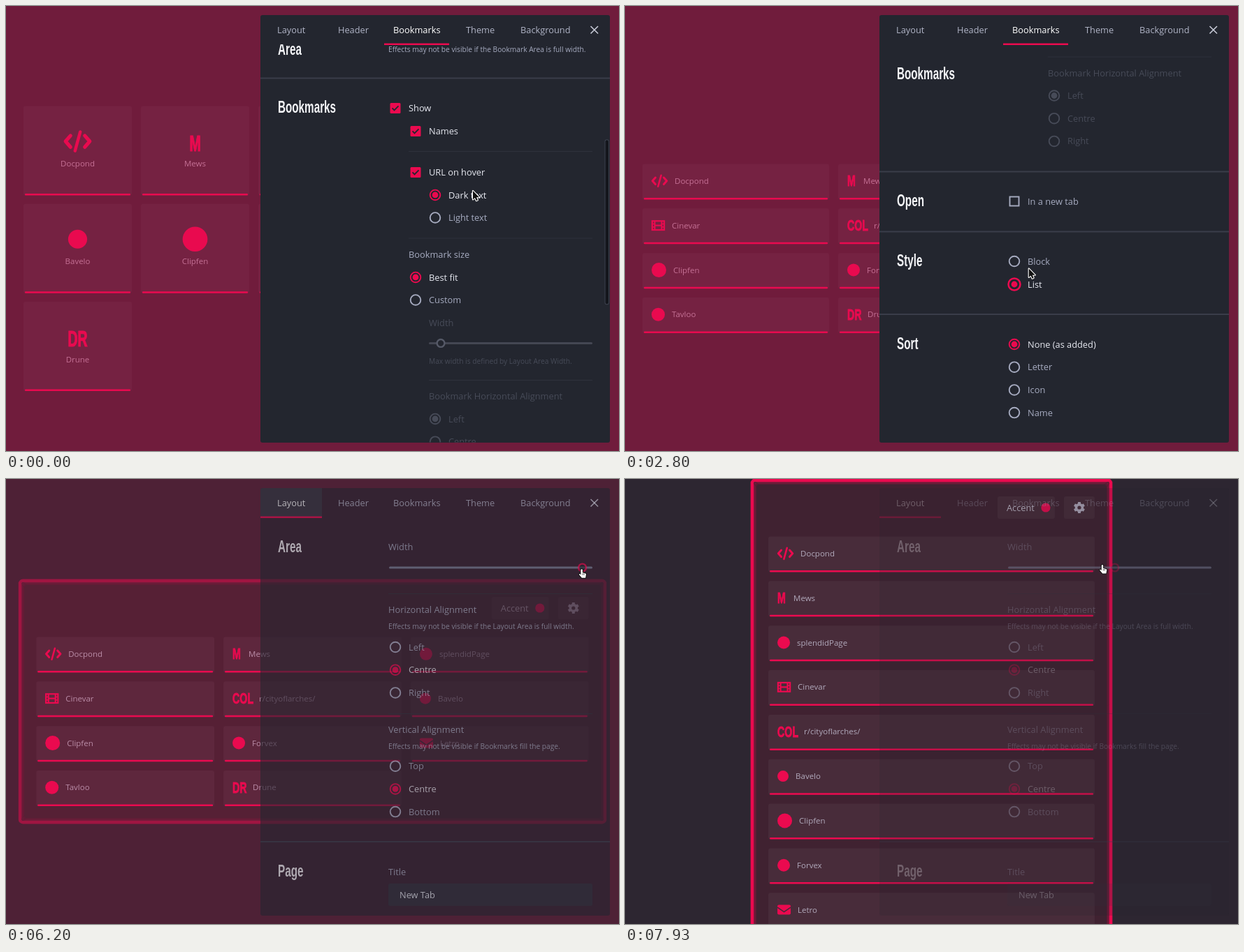
Write an HTML page with a canvas that moves like this. It is 877 by 638 pixels and loops after 8 s.

```html
<!DOCTYPE html>
<html lang="en">
<head>
<meta charset="utf-8">
<title>Bookmark page settings</title>
<style>
html, body { margin: 0; width: 100%; height: 100%; overflow: hidden; background: #2d2631; }
canvas { display: block; }
</style>
</head>
<body>
<canvas id="stage" width="877" height="638"></canvas>
<script>
const ctx = document.getElementById('stage').getContext('2d');
const W = 877, H = 638, LOOP = 8000;
const RED = '#eb0a4f', PANEL = '#23262f', LABEL = '#a6abc0', BRIGHT = '#e6e8f0', DIM = '#474b58';
const LIST_CLICK = 2350, TAB_CLICK = 3650;
const CONDENSE = 0.635;

// Time tracks: [time, value, ...]
const AREA_INSET = [[5940, 0], [6000, 5], [6730, 53], [7000, 64], [7800, 171], [7930, 180], [8000, 184]];
const POINTER = [
  [1780, 668, 265], [2250, 579, 394], [2650, 579, 394], [2800, 578, 377], [3450, 420, 60],
  [3580, 410, 36], [4250, 410, 36], [4730, 573, 190], [5300, 836, 128], [6000, 836, 129],
  [6730, 791, 130], [7000, 781, 130], [7800, 690, 125], [7930, 683, 123], [8000, 680, 123]
];

const TABS = [['Layout', 388], ['Header', 475], ['Bookmarks', 554], ['Theme', 658], ['Background', 736]];

// name, icon (a word in capitals is drawn as letters), icon width in list style
const BOOKMARKS = [
  ['Docpond', 'code', 23], ['Mews', 'M', 13], ['splendidPage', 'disc', 18],
  ['Cinevar', 'film', 19], ['r/cityoflarches/', 'COL', 28], ['Bavelo', 'disc', 16],
  ['Clipfen', 'disc', 21], ['Forvex', 'disc', 18], ['Letro', 'mail', 19],
  ['Tavloo', 'disc', 19], ['Drune', 'DR', 19]
];

const clamp = (v, lo = 0, hi = 1) => Math.min(hi, Math.max(lo, v));

function track(keys, t) {
  const next = keys.findIndex(k => k[0] > t);
  if (next === 0) return keys[0].slice(1);
  if (next < 0) return keys[keys.length - 1].slice(1);
  const a = keys[next - 1], b = keys[next], u = (t - a[0]) / (b[0] - a[0]);
  return a.slice(1).map((v, i) => v + (b[i + 1] - v) * u);
}

// ---------- drawing helpers ----------
function rect(x, y, w, h, color, r = 0) {
  ctx.fillStyle = color;
  ctx.beginPath();
  ctx.roundRect(x, y, w, h, r);
  ctx.fill();
}

function circle(x, y, r, fill, stroke, width = 2) {
  ctx.beginPath();
  ctx.arc(x, y, r, 0, 7);
  if (fill) { ctx.fillStyle = fill; ctx.fill(); }
  if (stroke) { ctx.strokeStyle = stroke; ctx.lineWidth = width; ctx.stroke(); }
}

function line(points, color, width) {
  ctx.strokeStyle = color;
  ctx.lineWidth = width;
  ctx.beginPath();
  points.forEach(([x, y]) => ctx.lineTo(x, y));
  ctx.stroke();
}

// y is the middle of the capital letters
function text(str, x, y, color, size = 12.8, align = 'left') {
  ctx.font = `${size}px "Open Sans", sans-serif`;
  ctx.textAlign = align;
  ctx.fillStyle = color;
  ctx.fillText(str, x, y + size * 0.357);
}

function display(str, x, y, color, size, align = 'left', weight = 0) {
  ctx.save();
  ctx.translate(x, y + size * 0.358);
  ctx.scale(CONDENSE, 1);
  ctx.font = `bold ${size}px "Liberation Sans", sans-serif`;
  ctx.textAlign = align;
  ctx.fillStyle = ctx.strokeStyle = color;
  ctx.fillText(str, 0, 0);
  if (weight) {
    ctx.lineWidth = weight;
    ctx.strokeText(str, 0, 0);
  }
  ctx.restore();
}

// ---------- page ----------
const ICONS = {
  code() {
    ctx.lineCap = ctx.lineJoin = 'round';
    line([[-6, -4.8], [-10.2, 0], [-6, 4.8]], RED, 3);
    line([[6, -4.8], [10.2, 0], [6, 4.8]], RED, 3);
    line([[2.2, -8], [-2.2, 8]], RED, 2.6);
  },
  disc(w) { circle(0, 0, w / 2, RED); },
  film() {
    ctx.strokeStyle = RED;
    ctx.lineWidth = 2.2;
    ctx.strokeRect(-8.6, -6.4, 17.2, 12.8);
    line([[-5, -6], [-5, 6]], RED, 2.2);
    line([[5, -6], [5, 6]], RED, 2.2);
    line([[-5, 0], [5, 0]], RED, 2.2);
    for (const y of [-2.2, 2.2]) {
      line([[-8, y], [-5, y]], RED, 1.6);
      line([[5, y], [8, y]], RED, 1.6);
    }
  },
  mail() {
    rect(-9.5, -7, 19, 14, RED, 2);
    line([[-9.5, -3.5], [0, 3], [9.5, -3.5]], '#46293a', 1.6);
  }
};

function icon(kind, cx, cy, width, scale) {
  ctx.save();
  ctx.translate(cx, cy);
  ctx.scale(scale, scale);
  ICONS[kind](width);
  ctx.restore();
}

function tile(x, y, w, h, [name, kind, iconWidth], list) {
  rect(x, y, w, h, 'rgba(255,255,255,.045)', 3);
  rect(x + 2, y + h - 2.5, w - 4, 2.5, RED, 1);
  const letters = !ICONS[kind], ink = '#b1a9bb';
  if (list) {
    const cy = y + 24.3;
    if (letters) display(kind, x + 13, cy - 0.5, RED, 22.4, 'left', 0.9);
    else icon(kind, x + 13 + iconWidth / 2, cy, iconWidth, 1);
    text(name, x + 23 + iconWidth, cy, ink, 11.5);
  } else {
    const cx = x + w / 2;
    if (letters) display(kind, cx, y + 53, RED, 30.7, 'center', 1.2);
    else icon(kind, cx, y + 50.5, iconWidth, 1.7);
    text(name, cx, y + 82.5, ink, 11.5, 'center');
  }
}

function gear(x, y) {
  circle(x, y, 4.4, null, '#b1a9bb', 3.6);
  for (let i = 0; i < 6; i++) {
    const a = i * Math.PI / 3 + Math.PI / 6, c = Math.cos(a), s = Math.sin(a);
    line([[x + c * 5, y + s * 5], [x + c * 8, y + s * 8]], '#b1a9bb', 4);
  }
}

function frame(x, y, w, h, fade) {
  ctx.globalAlpha = fade;
  rect(x, y, w, h, 'rgba(215,5,50,.11)', 5);
  ctx.strokeStyle = RED;
  const stroke = (inset, width, alpha) => {
    ctx.globalAlpha = fade * alpha;
    ctx.lineWidth = width;
    ctx.beginPath();
    ctx.roundRect(x + inset, y + inset, w - 2 * inset, h - 2 * inset, 4);
    ctx.stroke();
  };
  for (let i = 0; i < 4; i++) stroke(4.5 + i, 1, 0.4 - i * 0.09);
  stroke(1.8, 4.4, 1);
  ctx.globalAlpha = 1;
}

function page(inset, list, fade) {
  const left = inset + 25, inner = W - 2 * left, gap = 13;
  const columns = list ? clamp(Math.floor((inner + gap) / (230 + gap)), 1, 3) : 5;
  const tileW = (inner - gap * (columns - 1)) / columns;
  const tileH = list ? 51 : 128, pitch = list ? 63.85 : 140.2;
  const rows = Math.ceil(BOOKMARKS.length / columns);
  const height = 107.5 + (rows - 1) * pitch + tileH;
  const top = Math.max(0, (H - height) / 2);

  rect(0, 0, W, H, '#2d2631');
  if (fade) frame(inset, top, W - 2 * inset, height, fade);

  const right = left + inner, mid = top + 41;
  rect(right - 139, mid - 16, 82, 32, 'rgba(255,255,255,.045)', 3);
  text('Accent', right - 126, mid, '#c3bccb');
  circle(right - 70, mid, 6.6, RED);
  rect(right - 44, mid - 16, 44, 32, 'rgba(255,255,255,.045)', 3);
  gear(right - 22, mid);

  BOOKMARKS.forEach((b, i) => tile(
    left + (i % columns) * (tileW + gap),
    top + 82.5 + Math.floor(i / columns) * pitch,
    tileW, tileH, b, list));

  ctx.globalAlpha = 0.366 * (1 - fade);
  rect(0, 0, W, H, '#e40c50');
  ctx.globalAlpha = 1;
}

// ---------- settings panel ----------
function panel(t, inset, list, fade) {
  const onLayout = t >= TAB_CLICK;
  const opacity = rest => { ctx.globalAlpha = 1 - fade * (1 - rest); };
  const soft = () => opacity(0.27);

  const label = (str, x, y, color = LABEL) => { soft(); text(str, x, y, color); };
  const note = (str, x, y, color = LABEL) => { soft(); text(str, x, y, color, 10.2); };
  const rule = (x, y) => { soft(); rect(x, y - 0.5, 839 - x, 1, '#2e313c'); };

  function radio(str, x, y, on, { dim = false, halo = 0 } = {}) {
    const color = dim ? DIM : on ? RED : LABEL;
    opacity(on ? 0.27 : 0.34);
    circle(x, y, 7.3 + halo, null, color, 1.9 + halo * 0.5);
    if (on) circle(x, y, 4.4, color);
    label(str, x + 19, y, dim ? DIM : on ? BRIGHT : LABEL);
  }

  function checkbox(str, x, y, on) {
    if (on) {
      rect(x - 7.5, y - 7.5, 15, 15, RED, 1.5);
      line([[x - 4.5, y], [x - 1.5, y + 3], [x + 4.5, y - 3]], PANEL, 1.8);
    } else {
      ctx.strokeStyle = LABEL;
      ctx.lineWidth = 1.9;
      ctx.strokeRect(x - 6.5, y - 6.5, 13, 13);
    }
    label(str, x + 19, y, on ? BRIGHT : LABEL);
  }

  function slider(x, y, thumb, dim) {
    opacity(0.6);
    rect(x, y - 1.5, 839 - x, 3, dim ? '#444753' : '#6b6d82', 1.5);
    soft();
    circle(thumb, y, 5.4, PANEL, dim ? '#555967' : RED, 2.4);
  }

  // Sections: [start, title]; titles stick below the tabs until their section ends.
  function sections(list, end) {
    soft();
    list.forEach(([start, title], i) => {
      const stop = i + 1 < list.length ? list[i + 1][0] : end;
      if (start > 56) rect(364, start - 1, 500, 2, '#3a3d4a');
      display(title, 389, Math.min(Math.max(start + 41, 96), stop - 42), '#f4f5f8', 24);
    });
  }

  function bookmarksTab() {
    const scroll = 464 * (1 - (1 - clamp(t / 1729)) ** 2);
    const at = y => y - scroll;
    sections([[-300, 'Area'], [104, 'Bookmarks'], [701.5, 'Open'], [787.5, 'Style'], [906, 'Sort']]
      .map(([y, title]) => [at(y), title]), at(1090));

    note('Effects may not be visible if the Bookmark Area is full width.', 547, at(62.5));
    checkbox('Show', 557, at(147), true);
    checkbox('Names', 586, at(180), true);
    rule(576, at(209));
    checkbox('URL on hover', 586, at(239), true);
    radio('Dark text', 614, at(271.5), true);
    radio('Light text', 614, at(304), false);
    rule(576, at(333.5));
    label('Bookmark size', 576, at(356.5));
    radio('Best fit', 586, at(389.5), true);
    radio('Custom', 586, at(422), false);
    label('Width', 605, at(455), DIM);
    slider(605, at(484), 622, true);
    note('Max width is defined by Layout Area Width.', 605, at(510), DIM);
    rule(605, at(537));
    label('Bookmark Horizontal Alignment', 605, at(560), DIM);
    ['Left', 'Centre', 'Right'].forEach((s, i) => radio(s, 614, at(592.5 + i * 32.7), i === 0, { dim: true }));
    checkbox('In a new tab', 557, at(744), false);
    radio('Block', 557, at(830), !list);
    radio('List', 557, at(863), list, { halo: list ? 1.2 : 0 });
    ['None (as added)', 'Letter', 'Icon', 'Name'].forEach((s, i) => radio(s, 557, at(949 + i * 32.7), i === 0));

    ctx.globalAlpha = clamp((1800 - t) / 150);
    rect(856.5, 191 + scroll * 0.4207, 6.5, 237, '#3d414e', 3.2);
    rect(857.5, 192 + scroll * 0.4207, 4.5, 235, '#14161c', 2.2);
  }

  function layoutTab() {
    sections([[55, 'Area'], [520, 'Page']], 900);
    label('Width', 547, 97.5);
    slider(548, 127, 838.5 - inset * 0.765, false);
    rule(547, 164.5);
    label('Horizontal Alignment', 547, 187.5);
    note('Effects may not be visible if the Layout Area is full width.', 547, 211.5);
    ['Left', 'Centre', 'Right'].forEach((s, i) => radio(s, 557, 241 + i * 32.7, i === 1));
    rule(547, 336.5);
    label('Vertical Alignment', 547, 359);
    note('Effects may not be visible if Bookmarks fill the page.', 547, 383);
    ['Top', 'Centre', 'Bottom'].forEach((s, i) => radio(s, 557, 411.7 + i * 32.7, i === 1));
    label('Title', 547, 563);
    opacity(0.15);
    rect(547, 580, 292, 32, '#2f313d', 2);
    label('New Tab', 563, 596, BRIGHT);
  }

  opacity(0.2);
  rect(364, 13, 500, 613, PANEL, 3);

  ctx.save();
  ctx.beginPath();
  ctx.rect(364, 55, 500, 570.5);
  ctx.clip();
  onLayout ? layoutTab() : bookmarksTab();
  ctx.restore();

  const active = onLayout ? 'Layout' : 'Bookmarks';
  if (onLayout) {
    ctx.globalAlpha = 1 - fade;
    rect(364, 13, 88, 41, '#363a46', [3, 0, 0, 0]);
  }
  soft();
  if (onLayout) rect(364, 53.5, 88, 2.4, RED);
  else rect(541, 53.5, 93, 2.4, RED);
  TABS.forEach(([name, x]) => label(name, x, 34.5, name === active ? '#fff' : '#b0b4c6'));
  line([[836.5, 29], [847, 39.5]], '#c8cbd8', 1.6);
  line([[847, 29], [836.5, 39.5]], '#c8cbd8', 1.6);
  ctx.globalAlpha = 1;
}

// ---------- pointer ----------
const ARROW = new Path2D('M0 0V12.5L2.9 9.9 4.9 14.2 6.9 13.3 5 9.2H9Z');
const HAND = new Path2D('M-1.2 1.2a1.2 1.2 0 0 1 2.4 0V5l4 .9q1.3.4 1.1 1.8L5.5 12.4H.2L-3.6 8q-.5-1.5.9-1.2l1.5 1.1Z');

function pointer(t) {
  const [x, y] = track(POINTER, t);
  const hand = (t > 2200 && t < 2720) || (t > 3530 && t < 4300) || t > 5250;
  const shape = hand ? HAND : ARROW;
  ctx.save();
  ctx.translate(x, y);
  ctx.lineJoin = 'round';
  ctx.lineWidth = hand ? 2 : 2.2;
  ctx.strokeStyle = hand ? '#111' : '#fff';
  ctx.fillStyle = hand ? '#fff' : '#111';
  ctx.stroke(shape);
  ctx.fill(shape);
  if (hand) for (const fx of [1.4, 3.4]) line([[fx, 6], [fx, 8.5]], '#111', 0.7);
  ctx.restore();
}

function render(now) {
  const t = now % LOOP;
  const [inset] = track(AREA_INSET, t);
  const fade = clamp((t - 5950) / 500);
  const list = t >= LIST_CLICK;
  page(inset, list, fade);
  panel(t, inset, list, fade);
  pointer(t);
}

const start = performance.now();
function tick() {
  render(performance.now() - start);
  requestAnimationFrame(tick);
}
tick();
</script>
</body>
</html>
```
